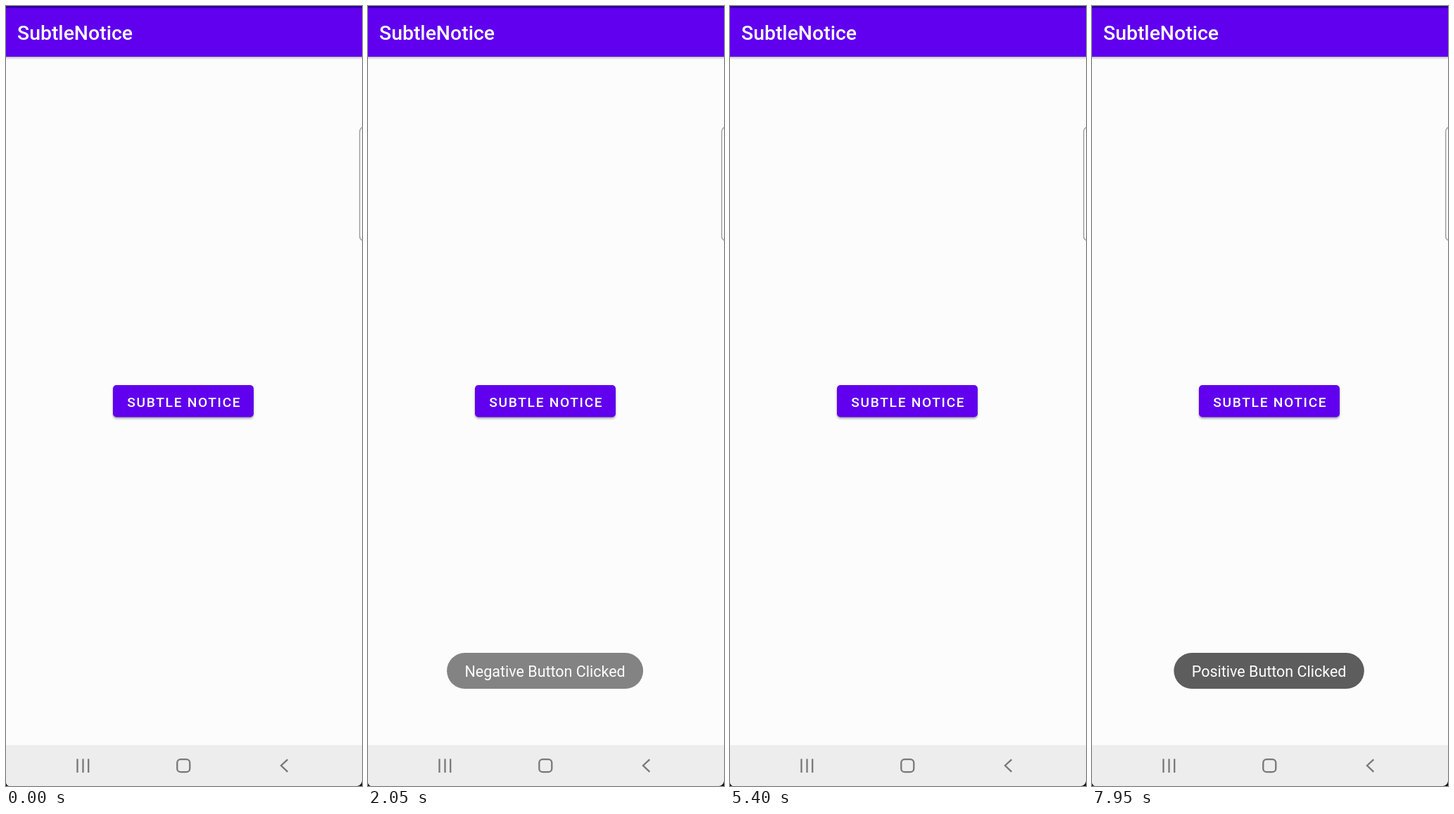
An HTML page for the animation above (8000 ms loop, 506x1107 px).

```html
<!DOCTYPE html>
<html lang="en">
<head>
<meta charset="utf-8">
<title>Dialog demo</title>
<style>
  html, body { margin: 0; width: 100%; height: 100%; overflow: hidden; background: #fcfcfc; }
  svg { display: block; width: 100%; height: 100%; }
  text { font-family: Roboto, "Noto Sans", sans-serif; }
  .mid { text-anchor: middle; }
  .medium { font-weight: 500; }
  .label { font-size: 22px; letter-spacing: 2px; fill: #fff; }
</style>
</head>
<body>
<svg viewBox="0 0 506 1107" preserveAspectRatio="none">
  <defs>
    <linearGradient id="barShade" x1="0" y1="0" x2="0" y2="1">
      <stop offset="0" stop-color="#000" stop-opacity=".24"/>
      <stop offset="1" stop-color="#000" stop-opacity="0"/>
    </linearGradient>
    <filter id="soft" x="-10%" y="-30%" width="120%" height="160%"><feGaussianBlur stdDeviation="1.6"/></filter>
    <clipPath id="noClip"><rect x="39.5" y="611.5" width="202.5" height="48" rx="4"/></clipPath>
    <clipPath id="yesClip"><rect x="261.5" y="611.5" width="203" height="48" rx="4"/></clipPath>
  </defs>

  <!-- App screen -->
  <rect width="506" height="1107" fill="#fcfcfc"/>
  <rect y="72" width="506" height="4" fill="url(#barShade)"/>
  <rect width="506" height="72" fill="#6000ee"/>
  <rect width="506" height="3" fill="#3200a0"/>
  <text class="medium" x="16" y="48" font-size="28.4" fill="#fff">SubtleNotice</text>
  <rect x="152" y="540.5" width="200" height="45" rx="5" opacity=".35" filter="url(#soft)"/>
  <rect x="152" y="538" width="200" height="45.5" rx="5" fill="#6000ee"/>
  <text class="mid medium" x="253.3" y="568.5" font-size="19.2" letter-spacing="1.7" fill="#fff">SUBTLE NOTICE</text>
  <rect y="1049" width="506" height="58" fill="#ededed"/>

  <rect id="dim" width="506" height="1107" opacity="0"/>

  <!-- System overlays -->
  <rect x="502.7" y="172" width="20" height="161" rx="6" fill="#fff" fill-opacity=".36" stroke="#808080" stroke-opacity=".75" stroke-width="1.5"/>
  <g id="nav" fill="none" stroke-width="2.3">
    <path d="M101.5 1068.5V1088M109.5 1068.5V1088M117.2 1068.5V1088"/>
    <rect x="243.3" y="1069.2" width="18" height="18" rx="5"/>
    <path d="M400.3 1069.3L391 1078L400.3 1086.9"/>
  </g>
  <path d="M506 1100V1107H499Q505 1106 506 1100ZM0 1103V1107H4Q1 1106 0 1103Z" fill="#111"/>

  <!-- Dialog -->
  <g id="dialog" opacity="0">
    <rect x="9.5" y="355" width="484.5" height="341" rx="15" fill="#fcfcfc"/>
    <circle cx="251.8" cy="418.5" r="42.4" fill="#00c835"/>
    <path d="M238.3 422L248.5 430.5L266.3 407.8" fill="none" stroke="#fff" stroke-width="7" stroke-linecap="round" stroke-linejoin="round"/>
    <text class="mid" x="251.8" y="526.8" font-size="32.5">This is title</text>
    <text class="mid" x="251.8" y="569" font-size="21.6">This is description</text>

    <rect id="noShade" x="39.5" width="202.5" height="48" rx="4" filter="url(#soft)"/>
    <g clip-path="url(#noClip)">
      <rect x="39" y="611" width="204" height="49" fill="#b5aebb"/>
      <circle id="noRipple"/>
    </g>
    <text class="mid medium label" x="142.3" y="644">No</text>

    <rect id="yesShade" x="261.5" width="203" height="48" rx="4" filter="url(#soft)"/>
    <g clip-path="url(#yesClip)">
      <rect x="261" y="611" width="204" height="49" fill="#b970ff"/>
      <circle id="yesRipple"/>
    </g>
    <text class="mid medium label" x="364.8" y="644">Yes</text>
  </g>

  <!-- Toast -->
  <g id="toast" opacity="0">
    <rect id="pill" y="918" height="51" rx="25.5" fill="#5d5d5d"/>
    <text id="message" class="mid" x="251.6" y="952" font-size="21.5" fill="#fff"></text>
  </g>
</svg>
<script>
const LOOP = 8000;
const $ = id => document.getElementById(id);
const set = (id, attrs) => {
  for (const key in attrs) $(id).setAttribute(key, attrs[key]);
};
const ramp = (t, start, length) => Math.min(1, Math.max(0, (t - start) / length));
const mix = (a, b, k) => a + (b - a) * k;

// Each visit: dialog opens, a button is pressed, dialog closes, toast appears.
const visits = [
  { open: 525, press: 1708, close: 1850, toast: 1900, button: "no",
    from: [172, 646], to: [141, 636], message: "Negative Button Clicked", width: 279 },
  { open: 5975, press: 7116, close: 7300, toast: 7350, button: "yes",
    from: [345, 640], to: [363, 636], message: "Positive Button Clicked", width: 270.5 }
];

function drawButton(name, t, visit) {
  const pressed = visit.button === name;
  const grow = pressed ? ramp(t, visit.press, 225) : 0;
  const ink = pressed ? ramp(t, visit.press, 40) : 0;
  set(name + "Ripple", {
    cx: mix(visit.from[0], visit.to[0], grow),
    cy: mix(visit.from[1], visit.to[1], grow),
    r: mix(61, 104, grow),
    opacity: 0.21 * ink
  });
  set(name + "Shade", { y: mix(613.5, 616.5, ink), opacity: mix(0.32, 0.38, ink) });
}

function draw(t) {
  const visit = t < 5000 ? visits[0] : visits[1];
  const shown = ramp(t, visit.open, 150) * (1 - ramp(t, visit.close, 150));
  const dark = ramp(t, visit.open, 310) * (1 - ramp(t, visit.close, 180));
  set("dim", { opacity: 0.65 * dark });
  set("dialog", { opacity: shown });
  const grey = Math.round(mix(120, 180, dark));
  set("nav", { stroke: `rgb(${grey},${grey},${grey})` });
  drawButton("no", t, visit);
  drawButton("yes", t, visit);

  const toast = ramp(t, visit.toast, 200) * (1 - ramp(t, visit.toast + 2200, 200));
  set("toast", { opacity: toast });
  set("pill", { x: 251.6 - visit.width / 2, width: visit.width });
  $("message").textContent = visit.message;
}

const begun = performance.now();
function tick() {
  draw((performance.now() - begun) % LOOP);
  requestAnimationFrame(tick);
}
tick();
</script>
</body>
</html>
```
